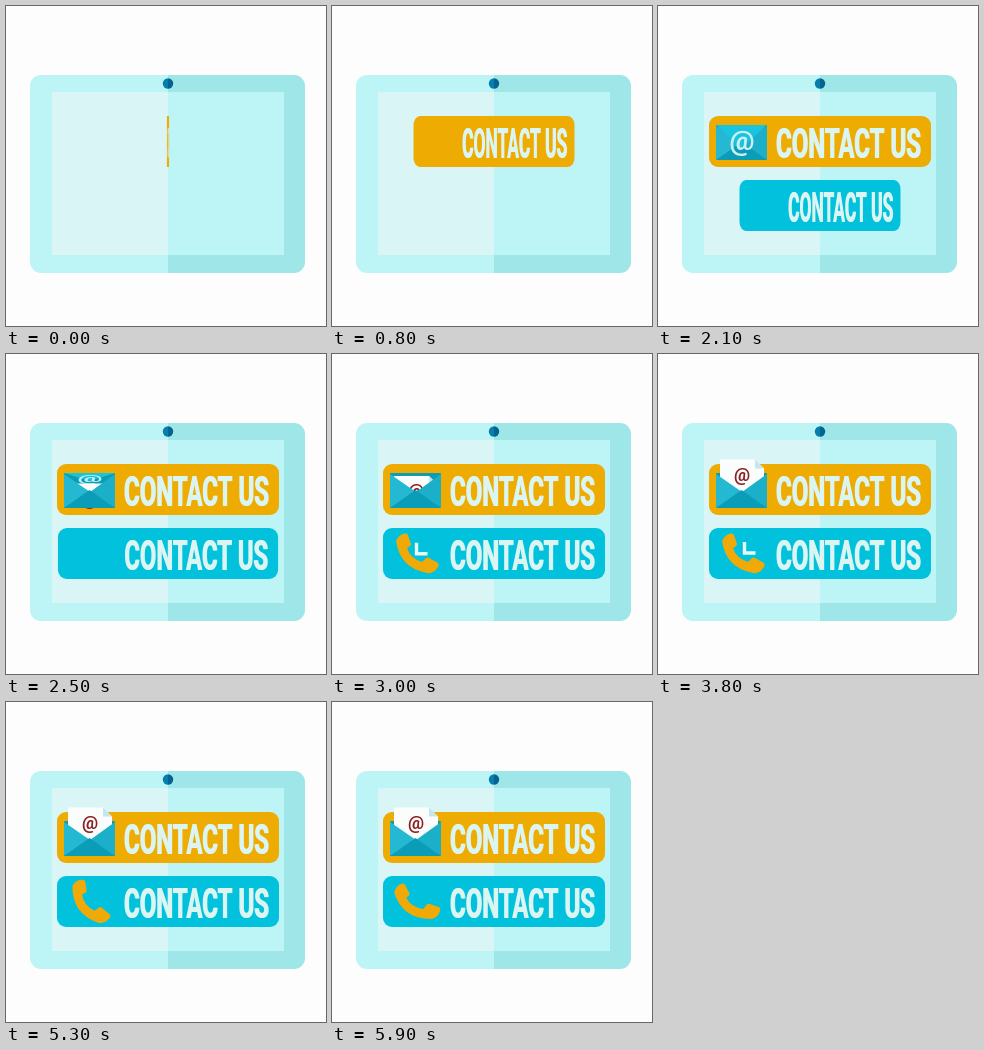
An HTML page with a canvas that plays this animation: 320 by 320 pixels, repeating every 6000 ms.

```html
<!DOCTYPE html>
<html lang="en">
<head>
<meta charset="utf-8">
<title>Contact us</title>
<style>
html, body { margin: 0; width: 100%; height: 100%; overflow: hidden; background: #fefdfe; }
canvas { display: block; width: 100vmin; height: 100vmin; }
</style>
</head>
<body>
<canvas id="stage"></canvas>
<script>
const LOOP = 6000, SIZE = 320, MID = 162;
const NARROW = 0.565; // condensed face: one aspect for all lettering
const canvas = document.getElementById('stage');
const ctx = canvas.getContext('2d');

const clamp = v => Math.min(1, Math.max(0, v));
const ramp = (t, from, to) => clamp((t - from) / (to - from));
const ease = u => (1 - Math.cos(Math.PI * u)) / 2;

function roundBox(x, y, w, h, r, color) {
  ctx.fillStyle = color;
  ctx.beginPath();
  ctx.roundRect(x, y, w, h, r);
  ctx.fill();
}

function polygon(color, ...points) {
  ctx.fillStyle = color;
  ctx.beginPath();
  points.forEach(([x, y]) => ctx.lineTo(x, y));
  ctx.closePath();
  ctx.fill();
}

function around(x, y, sx, sy, angle, draw) {
  if (!sx || !sy) return;
  ctx.save();
  ctx.translate(x, y);
  ctx.rotate(angle);
  ctx.scale(sx, sy);
  ctx.translate(-x, -y);
  draw();
  ctx.restore();
}

function tablet() {
  roundBox(24, 69, 138, 198, [11, 0, 0, 11], '#bdf5f6');
  roundBox(MID, 69, 137, 198, [0, 11, 11, 0], '#9ee6e7');
  roundBox(46, 86, 116, 163, 0, '#d9f5f5');
  roundBox(MID, 86, 116, 163, 0, '#bdf5f6');
  [['#077fad', 0.5], ['#046390', -0.5]].forEach(([color, side]) => {
    ctx.fillStyle = color;
    ctx.beginPath();
    ctx.arc(MID, 77.5, 5.2, side * Math.PI, (side + 1) * Math.PI);
    ctx.fill();
  });
}

function bar(y, color, t) {
  if (t < 0) return;
  const grow = ease(clamp((t + 86) / 1366));
  around(MID, y, grow, 1, 0, () => {
    roundBox(51, y, 222, 51, 9, color);
    ctx.save();
    ctx.translate(117.5, y + 41.5);
    ctx.scale(NARROW, 1);
    ctx.font = '700 42.5px Roboto, "Liberation Sans", sans-serif';
    ctx.textAlign = 'left';
    ctx.textBaseline = 'alphabetic';
    ctx.fillStyle = '#daf5f2';
    for (const shift of [0, 1.6]) ctx.fillText('CONTACT US', shift, 0);
    ctx.restore();
  });
}

function at(x, y, size, color) {
  ctx.font = `700 ${size}px Roboto, "Liberation Sans", sans-serif`;
  ctx.textAlign = 'center';
  ctx.textBaseline = 'middle';
  ctx.fillStyle = color;
  ctx.fillText('@', x, y);
}

function letter(top) {
  polygon('#fbfdfd', [62, top], [97, top], [106, top + 9], [106, 150], [62, 150]);
  polygon('#c5e6ec', [97, top], [106, top + 9], [97, top + 9]);
  at(84, top + 16, 18, '#8b2020');
}

function envelope(t) {
  const open = ease(ramp(t, 2200, 2700));
  around(84, 136.5, ease(ramp(t, 1300, 1700)), ease(ramp(t, 1300, 1700)), 0, () => {
    roundBox(58, 119, 51, 35, 1, '#0c9db4');
    if (open > 0) letter(Math.max(105.5, 122 - (Math.max(t, 2750) - 3000) * 0.03));
    polygon('#25b8d2', [58, 120], [84, 138], [58, 154]);
    polygon('#1cafca', [109, 120], [84, 138], [109, 154]);
    polygon('#0b9cb7', [58, 154], [83.5, 136], [109, 154]);
    if (open < 1) {
      around(84, 119, 1, 1 - open, 0, () => {
        polygon('#18c4de', [58, 119], [109, 119], [83.5, 142]);
        at(84, 136, 28, '#c8f0f4');
      });
    }
  });
}

function chevron(x, y) {
  ctx.strokeStyle = '#e6f9f7';
  ctx.lineWidth = 3.4;
  ctx.beginPath();
  ctx.moveTo(x, y - 11);
  ctx.lineTo(x, y);
  ctx.lineTo(x + 11, y);
  ctx.stroke();
}

function handset() {
  ctx.fillStyle = '#f0aa08';
  ctx.beginPath();
  ctx.moveTo(64, 187);
  ctx.quadraticCurveTo(67, 180, 73, 179.5);
  ctx.quadraticCurveTo(75, 179, 76, 181);
  ctx.lineTo(79, 190);
  ctx.quadraticCurveTo(79, 192, 75, 194);
  ctx.quadraticCurveTo(78, 204, 90, 208);
  ctx.lineTo(94, 204);
  ctx.quadraticCurveTo(96, 203, 98, 204.5);
  ctx.lineTo(106, 209);
  ctx.quadraticCurveTo(107.5, 210.5, 106, 213);
  ctx.quadraticCurveTo(102, 220, 95, 219);
  ctx.quadraticCurveTo(68, 214, 64, 187);
  ctx.fill();
}

function phone(t) {
  const scale = ease(ramp(t, 2600, 3000));
  const swing = t < 5000 ? 0 : -0.17 * Math.sin((t - 5000) / 400 * 2 * Math.PI);
  around(85, 199.5, scale, scale, swing, () => {
    handset();
    if (t >= 2800 && t < 4800) {
      const u = (t - 2800) % 1000 / 1000;
      const slide = clamp(u / 0.5);
      chevron(86.5 - 5 * slide, 199 + 2 * slide);
      if (u > 0.4) chevron(87.5, 195.5);
    }
  });
}

function render(t) {
  const ratio = canvas.width / SIZE;
  ctx.setTransform(ratio, 0, 0, ratio, 0, 0);
  roundBox(0, 0, SIZE, SIZE, 0, '#fefdfe');
  tablet();
  bar(110, '#eeab02', t);
  bar(174, '#02c1dc', t - 1300);
  envelope(t);
  phone(t);
}

function resize() {
  const side = Math.min(innerWidth, innerHeight) || SIZE;
  canvas.width = canvas.height = Math.round(side * (devicePixelRatio || 1));
}

const start = performance.now();
function tick() {
  const elapsed = (performance.now() - start) % LOOP;
  render(Math.floor(elapsed / 100) * 100);
  requestAnimationFrame(tick);
}

addEventListener('resize', resize);
resize();
tick();
</script>
</body>
</html>
```
